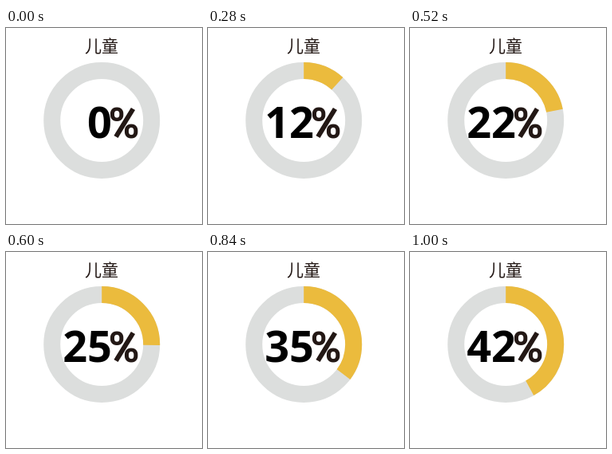
Animation, 246 px wide and 246 px high, one loop 4000 ms. Source, as an HTML page:

```html
<!DOCTYPE html>
<html lang="zh">
<head>
<meta charset="utf-8">
<title>儿童</title>
<style>
  html, body { margin: 0; width: 100%; height: 100%; overflow: hidden; background: #fff; }
  svg { display: block; width: 100%; height: 100%; }
  circle { fill: none; stroke-width: 21; }
  .title { font: 400 21px "Noto Sans CJK SC", "Noto Sans CJK", sans-serif; text-anchor: middle; fill: #231815; }
  .number { font: 700 54px "Noto Sans", "Open Sans", sans-serif; text-anchor: end; }
  .percent { font: 700 53px Roboto, sans-serif; fill: #231815; }
</style>
</head>
<body>
<svg viewBox="0 0 246 246">
  <text class="title" x="120" y="30">儿童</text>
  <circle cx="120.2" cy="116" r="62.5" stroke="#dcdedd"/>
  <circle id="arc" cx="120.2" cy="116" r="62.5" stroke="#ebbb3d" pathLength="100"
          stroke-dasharray="0 100" transform="rotate(-90 120.2 116)"/>
  <text class="number" id="number" x="133" y="138">0</text>
  <text class="percent" x="128.5" y="137.5">%</text>
  <!-- lengthens the slash of the percent sign to full height -->
  <path d="M159.5 101.5L138 136.5" stroke="#231815" stroke-width="6"/>
</svg>
<script>
  const LOOP = 4000, STEP = 40, STEPS = 25, GOAL = 42;
  const arc = document.getElementById("arc");
  const number = document.getElementById("number");
  const start = performance.now();

  function draw() {
    const time = (performance.now() - start) % LOOP;
    const step = Math.min(STEPS, Math.floor(time / STEP));
    const value = GOAL * step / STEPS;
    arc.setAttribute("stroke-dasharray", `${value} 100`);
    arc.style.visibility = step ? "visible" : "hidden";
    number.textContent = Math.round(value);
    requestAnimationFrame(draw);
  }
  draw();
</script>
</body>
</html>
```
